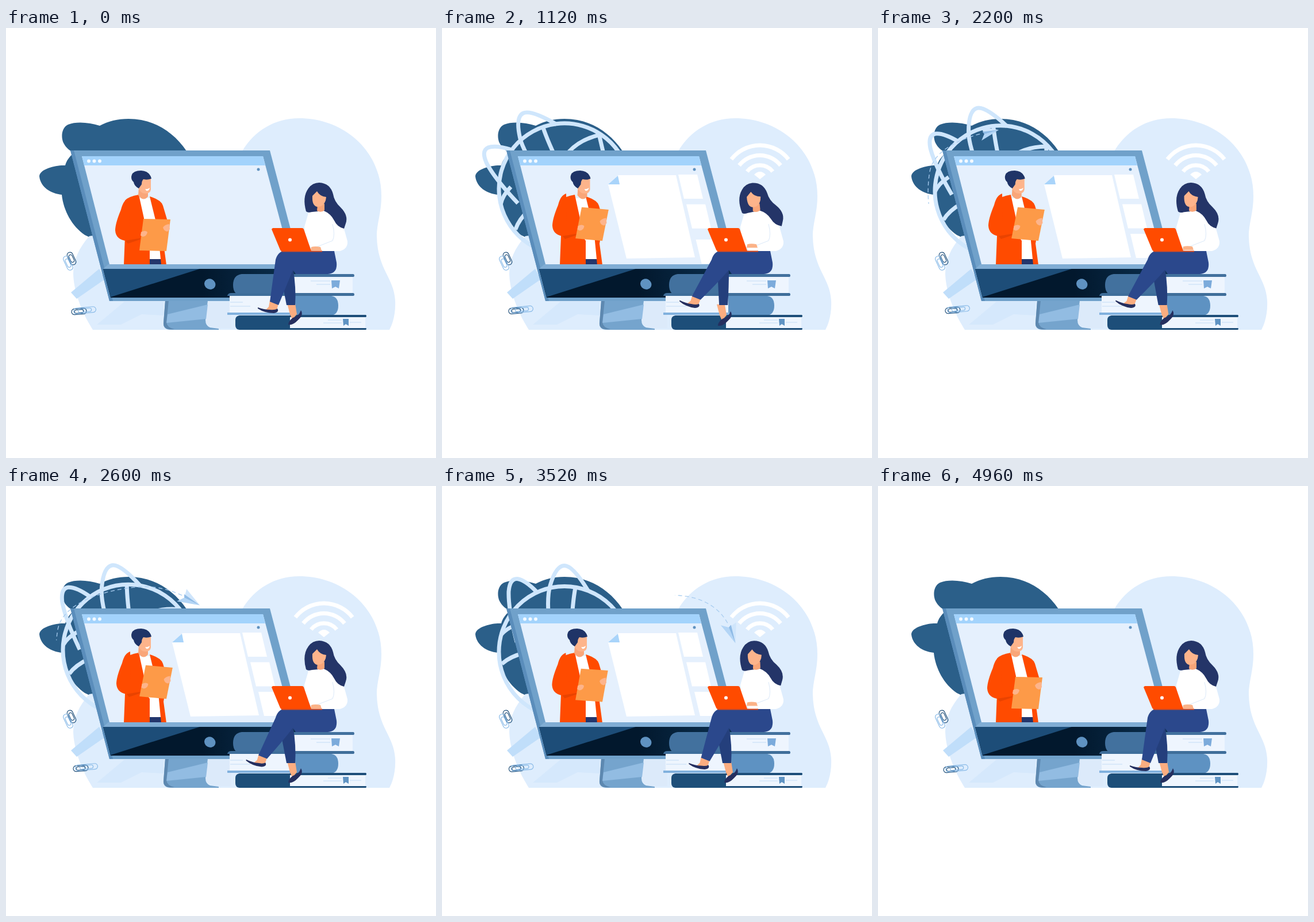
An HTML page that plays this animation: 748x748 px, repeating every 5000 ms.

```html
<!DOCTYPE html>
<html lang="en">
<head>
<meta charset="utf-8">
<title>Online lesson</title>
<style>
  html, body { margin: 0; width: 100%; height: 100%; overflow: hidden; background: #fff; }
  svg { display: block; width: 100%; height: 100%; }
</style>
</head>
<body>
<svg viewBox="0 0 748 748" xmlns="http://www.w3.org/2000/svg">
  <defs>
    <clipPath id="screen"><path d="M136 239H451L497 411H180Z"/></clipPath>
    <clipPath id="sky"><path d="M0 0H748V400H480L459 213H113L150 400H0Z"/></clipPath>
    <linearGradient id="chin"><stop offset=".5" stop-color="#02182d"/><stop offset="1" stop-color="#0c3252"/></linearGradient>
  </defs>

  <!-- backdrop -->
  <path fill="#2b5f89" d="M314 214C291 180 256 158 213 158C194 158 178 162 163 170C145 164 122 162 108 168C97 173 95 189 100 200C104 208 110 213 118 217C110 224 105 231 103 239C85 238 58 246 58 258C60 277 78 288 97 290C100 318 115 345 137 360L220 400V214Z"/>
  <path fill="#deedfd" d="M145 362C127 382 117 404 117 428C118 462 135 500 151 525H667C674 512 678 494 677 474C675 434 646 420 645 362C645 340 653 322 653 292C653 214 588 157 510 157C467 157 432 179 411 214L300 340Z"/>
  <path fill="#c0defa" d="M113 460L162 419L172 437L123 471Z"/>
  <path fill="#d5e8fc" d="M158 516L206 476H274V500L236 498L200 516Z"/>
  <g id="clips" fill="none" stroke-width="1.2"></g>

  <g id="globe" fill="none" stroke="#cfe6fc" stroke-width="7">
    <circle r="114"/>
    <path d="M-25-40Q-32-90-25-115Q-15-150 0-150Q15-150 42-105"/>
    <path d="M-83-17Q-98-75-97-105Q-95-128-82-127Q-68-125-48-104"/>
    <path d="M19-112Q14-85 12-40M90-24L98-53Q66-62 38-53M-110-30Q-100-42-80-48M-109 21Q-95 8-70 2"/>
  </g>

  <!-- monitor -->
  <path fill="#dceafa" d="M351 476L347 510Q348 520 369 522H392V476Z"/>
  <path fill="#75a4cd" d="M277 474H351L347 508Q347 518 355 521L370 523V525H287Q274 525 274 514Z"/>
  <path fill="#92bce2" d="M281 498L351 481L348 506L279 513Z"/>
  <path fill="#5d88b0" d="M277 474H283L279 512Q280 521 293 524H284Q273 523 274 513Z"/>
  <path fill="#70a1ca" d="M112 213H459L528 475H180Z"/>
  <path fill="#5a8dbb" d="M112 213H118L186 475H180Z"/>
  <path fill="#e5f0fd" d="M132 223H447L497 411H180Z"/>
  <path fill="#a3d3fc" d="M132 223H447L451 239H136Z"/>
  <path stroke="#f4faff" stroke-width="6" stroke-linecap="round" stroke-dasharray="0 9.5" d="M144 231.500h20"/>
  <path fill="#80add4" d="M178 411H500V419H169Z"/>
  <path fill="url(#chin)" d="M169 419H515V469H182Z"/>
  <path fill="#1d4d78" d="M169 419H337L182 468Z"/>
  <ellipse cx="355" cy="445.500" rx="10" ry="9" fill="#5f92c1" transform="rotate(30 355 445)"/>

  <g clip-path="url(#screen)">
    <g id="pages"></g>
    <circle cx="439" cy="246" r="2.500" fill="#5f92c0"/>

    <!-- teacher -->
    <path fill="#fff" d="M232 296H250L260 335L271 404H246Z"/>
    <path fill="#24366c" d="M249 402H270V412H250Z"/>
    <path fill="#ff4b00" d="M231 290Q213 293 207 300L200 340L207 362L205 412H250V370L241 358L240 331Z"/>
    <path fill="#ff4b00" d="M250 293Q270 299 273 309L281 336L274 375L279 412H270L264 350Z"/>
    <g id="sleeve">
      <path fill="#e94300" d="M207 369L235 362L233 368L212 375Z"/>
      <path fill="#ff4b00" d="M214 296Q204 299 200 316Q190 340 190 352Q191 367 207 370L237 365V350L215 345Z"/>
    </g>
    <g id="manHead">
      <path fill="#f9a679" d="M231 277H247V293Q239 303 230 291Z"/>
      <path fill="#fdb48b" d="M232 262H252V281Q251 288 243 288Q234 288 230 278Z"/>
      <path fill="#1f3467" d="M231 279Q223 275 222 268Q218 265 218 259Q219 248 235 248Q250 249 253 262Q246 265 239 263Q236 266 236 272Z"/>
      <path fill="#fff" d="M242 280Q246 281 250 278Q249 284 244 283Z"/>
    </g>
    <path id="board" fill="#fd9a48" d="M239 332L286 333L279 388L232 387Z"/>
    <g id="hands" fill="#fdb48b">
      <path d="M235 355Q242 351 246 355Q245 362 238 363L234 361Z"/>
      <path d="M284 341Q276 342 273 347Q275 354 281 354L285 350Z"/>
    </g>
  </g>

  <g id="waves" fill="none" stroke="#fff" stroke-width="7"></g>

  <g clip-path="url(#sky)">
    <path id="route" fill="none" d="M96 345C88 320 84 285 90 250C98 205 165 182 225 176C265 172 300 183 335 207C360 215 375 189 400 190C455 190 495 215 507 265C510 290 507 320 505 345"/>
    <path id="trail" fill="none" stroke="#a9cdf0" stroke-width="1.3" stroke-dasharray="7 5"/>
    <g id="plane">
      <path fill="#b3d5f6" d="M20 0L-18 14L-10 2Z"/>
      <path fill="#cfe5fb" d="M20 0L-10 2L-14-13Z"/>
      <path fill="#8fbbe6" d="M20 0L-10 2L-13-3Z"/>
    </g>
  </g>

  <!-- books -->
  <path fill="#eef5fe" d="M470 432H603V462H470ZM389 466H500V496H389ZM494 503H625V522H494Z"/>
  <path fill="#42719e" d="M410 428H604Q606 428 606 430.500T604 433H496V466H410Q395 464 395 447T410 428Z"/>
  <path fill="#3f6e9a" d="M385 466Q386 461 392 461H604Q606 461 606 463.500T604 466Z"/>
  <path fill="#7cabdb" d="M566 439H581L579 453L573 450L567 453Z"/>
  <path fill="#5e92c2" d="M498 466H566Q578 468 578 483T566 500H498Z"/>
  <path fill="#81b1de" d="M385 495H500V499H385Z"/>
  <path fill="#1d4e79" d="M406 500H494V525H406Q399 524 399 517V508Q399 501 406 500ZM494 499H626Q628 501 626 503H494ZM494 522H626Q628 523 626 525H494Z"/>
  <path fill="#5f93c3" d="M586 506H596V518L591 515L587 518Z"/>
  <path fill="none" stroke="#c3dcf5" d="M530 440H564M540 446H564M390 477H412M390 484H425M560 508H584M552 513H584M598 512H618"/>

  <!-- student -->
  <g id="backFoot">
    <path fill="#fbad80" d="M489 479H503L506 498L498 507L494 498Z"/>
    <path fill="#252f5f" d="M513 491Q518 499 509 507Q499 518 491 516Q491 510 499 504Q510 501 513 491Z"/>
  </g>
  <path id="backLeg" fill="#243f7c"/>
  <g id="frontFoot">
    <path fill="#fbad80" d="M459 474L474 479L471 491H451L457 485Z"/>
    <path fill="#252f5f" d="M438 486Q449 490 459 490Q468 491 472 488Q476 494 466 496Q450 496 438 488Z"/>
  </g>
  <path id="frontLeg" fill="#2b488c"/>
  <path fill="#fff" d="M526 322Q545 314 563 317Q580 321 586 342L594 371Q595 384 581 388H534L524 372Q520 360 519 346Z"/>
  <path fill="none" stroke="#dbe9f9" d="M568 341Q573 360 568 370L540 381"/>
  <path id="typing" fill="#fbb287" d="M531 381Q538 379 547 381L549 387H530Z"/>
  <path fill="#ff4b00" d="M464 348H515Q517 348 518 350L531 388H480Q478 388 477 386L462 350Z"/>
  <path fill="#d94a1e" d="M478 387.500H550V389.500H480Z"/>
  <circle cx="494" cy="368.500" r="3" fill="#fff"/>
  <g id="girlHead">
    <path fill="#243568" d="M545 269Q564 270 569 289Q571 302 582 312Q596 326 591 340L588 349Q576 346 571 335Q565 323 553 318L532 320Q525 322 522 319Q515 294 526 279Q533 269 545 269Z"/>
    <path fill="#f9a679" d="M542 306H554V317Q548 322 541 318Z"/>
    <path fill="#fdb48b" d="M541 284Q535 290 533 292Q532 309 541 311Q552 312 556 300L557 294Q546 293 541 284Z"/>
  </g>
</svg>

<script>
const LOOP = 5000, SLANT = 0.26;
const $ = id => document.getElementById(id);
const put = (id, attrs) => { for (const k in attrs) $(id).setAttribute(k, attrs[k]); };
const move = (id, x, y, more = '') => put(id, { transform: `translate(${x} ${y}) ${more}` });

// Smooth rise from 0 to 1 between two times
function rise(t, from, to) {
  const p = Math.max(0, Math.min(1, (t - from) / (to - from)));
  return p * p * (3 - 2 * p);
}
// Rise to 1, hold, then fall back to 0
const hold = (t, in0, in1, out0, out1) => rise(t, in0, in1) * (1 - rise(t, out0, out1));

function buildPages() {
  const rows = (x, y, w, n, gap) => Array.from({ length: n }, (_, i) =>
    `M${x + SLANT * i * gap} ${y + i * gap}h${w}`).join('');
  const sheet = (id, shape, lines, weight) =>
    `<g id="${id}"><path fill="#fff" d="${shape}"/>` +
    `<path stroke="#74a8d8" stroke-width="${weight}" d="${lines}"/></g>`;
  let html = sheet('doc', 'M307 256H407L440 399L321 401L289 272Z',
    rows(327, 276, 41, 1) + rows(323, 282, 52, 1) + rows(322, 306, 67, 5, 6) + rows(333, 345, 66, 5, 5.8), 1.6);
  for (let i = 0; i < 3; i++) {
    const x = 411 + 14 * i, y = 255 + 51.5 * i;
    html += sheet('thumb' + i, `M${x} ${y}h33l10 42h-33z`,
      rows(x + 11, y + 6, 15, 1) + rows(x + 9, y + 11, 22, 3, 3) + rows(x + 12, y + 24, 22, 5, 3), 1);
  }
  $('pages').innerHTML = html;
  $('doc').insertAdjacentHTML('beforeend', '<path fill="#a9d4fa" d="M306 257L309 272H289Z"/>');
}

function buildWaves() {
  const cx = 553, cy = 267;
  let html = `<path id="wave0" fill="#fff" stroke="none" d="M543 255Q553 245 563 255L553 263Z"/>`;
  for (let i = 1; i < 4; i++) {
    const r = 11 + 17.3 * i, dx = r * Math.sin(0.91), y = cy - r * Math.cos(0.91);
    html += `<path id="wave${i}" d="M${cx - dx} ${y}A${r} ${r} 0 0 1 ${cx + dx} ${y}"/>`;
  }
  $('waves').innerHTML = html;
}

function buildClips() {
  const loop = (w, h) => `<rect x="${-w / 2}" y="${-h / 2}" width="${w}" height="${h}" rx="${w / 2}"/>`;
  const clip = (x, y, turn, color, h) =>
    `<g transform="translate(${x} ${y}) rotate(${turn})" stroke="${color}">${loop(10, h)}${loop(6, h * 0.6)}</g>`;
  const dark = '#23527c', pale = '#8abbe8';
  $('clips').innerHTML = clip(114, 401, -25, dark, 23) + clip(108, 409, -25, pale, 26) +
    `<g id="lowClip">${clip(127, 493, 85, dark, 26)}${clip(137, 491, 85, pale, 39)}</g>`;
}

buildPages();
buildWaves();
buildClips();

const route = $('route'), length = route.getTotalLength();
const spot = s => route.getPointAtLength(s);

function drawPlane(t) {
  const p = Math.max(0, Math.min(1, (t - 1620) / 2880));
  const head = length * (1 - (1 - p) ** 1.85);
  const tail = 40 + 620 * rise(t, 2300, 4300);
  const at = spot(head), a = spot(head - 3), b = spot(head + 3);
  const turn = Math.atan2(b.y - a.y, b.x - a.x) * 180 / Math.PI;
  const opacity = hold(t, 1550, 1900, 4000, 4700);
  move('plane', at.x, at.y, `rotate(${turn}) scale(${0.5 + 0.5 * rise(t, 1600, 2500)})`);
  put('plane', { opacity });
  let d = '';
  for (let s = tail; s < head - 12; s += 4) {
    const q = spot(s);
    d += `${d ? 'L' : 'M'}${q.x} ${q.y}`;
  }
  put('trail', { d, opacity, 'stroke-dashoffset': tail % 12 });
}

function drawStudent(t) {
  const tilt = hold(t, 0, 1000, 1200, 2500) + hold(t, 3000, 4200, 4200, 4950);
  put('girlHead', { transform: `rotate(${-6 * tilt} 548 320)` });
  move('typing', 0, -5 * Math.sin(2 * Math.PI * t / LOOP) ** 2);

  const x = -28 * hold(t, 0, 1450, 1450, 4700), y = 0.38 * x;
  move('frontFoot', x, y, `rotate(${-x * 0.3} 464 482)`);
  put('frontLeg', { d: `M534 388H484Q473 389 469 403L${459 + x} ${476 + y}L${474 + x} ${482 + y}` +
    `Q${488 + x * 0.35} ${448 + y * 0.5} 499 421L504 428H560Q577 427 575 408L571 388Z` });

  const back = -15 * hold(t, 0, 800, 1000, 2400), ankle = back * 0.4;
  move('backFoot', back * 0.75, -back * 0.12);
  put('backLeg', { d: `M480 440L${488 + ankle} 482H${503 + ankle}Q${505 + ankle} 452 499 416L478 428Z` });
}

function drawTeacher(t) {
  const raise = hold(t, 200, 1000, 3250, 4000);
  move('board', 2 * raise, -19 * raise, `rotate(${4 * raise} 259 360)`);
  move('hands', 1.5 * raise, -10.5 * raise);
  move('sleeve', 2 * raise, -8 * raise);
  move('manHead', 5.5 * hold(t, 300, 900, 1900, 2500), 0);
}

function drawPages(t) {
  const slide = (id, d, opacity) => { move(id, SLANT * d, d); put(id, { opacity }); };
  slide('doc', 160 * (1 - rise(t, 250, 950)) - 170 * rise(t, 3540, 4150), hold(t, 200, 400, 3950, 4150));
  for (let i = 0; i < 3; i++) {
    const lag = 90 * i;
    slide('thumb' + i, 150 * (1 - rise(t, 350 + lag, 1050 + lag)) - 110 * rise(t, 3650 + lag, 4800 + lag),
      hold(t, 300, 500, 3750, 4500));
  }
}

function draw(t) {
  const turn = (t - 3520) * 0.012;
  move('globe', 213, 288.5 + turn * 0.3, `rotate(${turn})`);
  put('globe', { opacity: hold(t, 60, 560, 4350, 4850) });
  for (let i = 0; i < 4; i++) {
    const on = 200 + i * 160, off = 4800 - i * 120;
    put('wave' + i, { opacity: hold(t, on, on + 200, off - 180, off) });
  }
  const sway = Math.sin(Math.PI * t / LOOP);
  move('lowClip', 3 * sway, -2 * sway);
  drawPages(t);
  drawPlane(t);
  drawStudent(t);
  drawTeacher(t);
}

let start = null;
function tick(now) {
  start ??= now;
  draw((now - start) % LOOP);
  requestAnimationFrame(tick);
}
draw(0);
requestAnimationFrame(tick);
</script>
</body>
</html>
```
